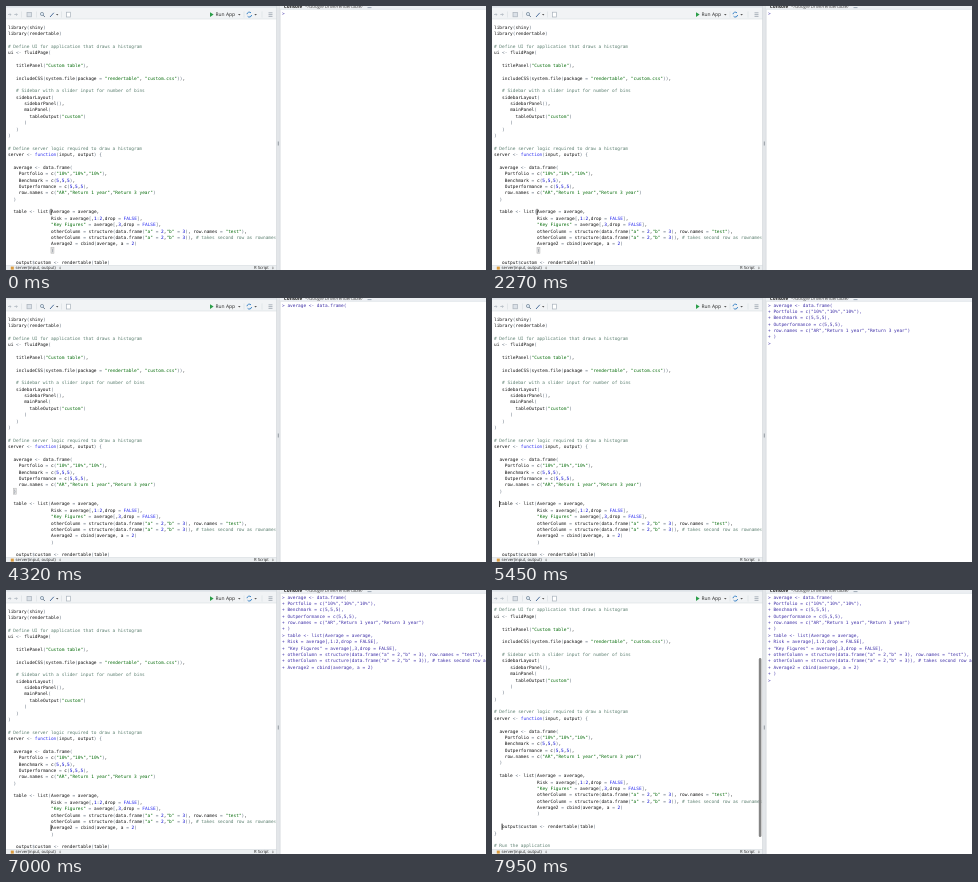
An HTML page for the animation above (8000 ms loop, 480 by 264 pixels).

```html
<!DOCTYPE html>
<html lang="en">
<head>
<meta charset="utf-8">
<title>Code editor and console</title>
<style>
  html, body { margin: 0; width: 100%; height: 100%; overflow: hidden; background: #fff; }
  svg { display: block; width: 480px; height: 264px; }
  text { text-rendering: geometricPrecision; white-space: pre; }
  .code text { font: 4.47px "DejaVu Sans Mono", "Noto Sans Mono", monospace; fill: #111; }
  .console text { fill: #3d2ea6; }
  .com { fill: #5c7f70; }
  .str { fill: #036a07; }
  .num { fill: #0000cd; }
  .key { fill: #2a2cf0; }
  .op { fill: #5d6a79; }
  .ui { font-family: "Open Sans", "Liberation Sans", sans-serif; fill: #222; }
</style>
</head>
<body>
<svg id="stage" viewBox="0 0 480 264">
  <defs>
    <clipPath id="leftClip"><rect y="13" width="269.5" height="246.5"/></clipPath>
  </defs>
  <rect width="480" height="264" fill="#fff"/>

  <g class="code" clip-path="url(#leftClip)">
    <g id="editor">
      <rect id="match" width="3" height="6" fill="#e4e4e4" stroke="#b5b5b5" stroke-width=".5"/>
      <rect id="caret" width=".8" height="6.2" fill="#111"/>
    </g>
  </g>
  <rect id="thumb" x="266.8" width="2.6" rx="1.3" fill="#858585"/>
  <g id="console" class="code console"></g>

  <!-- editor toolbar -->
  <rect width="271" height="13" fill="#f1f3f5"/>
  <rect width="271" height="1.6" fill="#dde2e7"/>
  <path d="M0 13H271" stroke="#d9dde1" stroke-width=".6"/>
  <g fill="none" stroke="#a9b2bb" stroke-width=".7">
    <path d="M2 8.5h3m-1.2-1.2L5 8.5L3.8 9.7M8.3 8.5h3m-1.2-1.2l1.2 1.2l-1.2 1.2"/>
    <path d="M15.5 5.5v6M30.5 5.5v6M55.5 5.5v6" stroke="#d3d8dc" stroke-width=".5"/>
    <rect x="21" y="6.4" width="4.4" height="4.4" fill="#dbe1e8"/>
    <rect x="60.5" y="6.2" width="4" height="4.8" fill="#fff"/>
    <circle cx="36" cy="8" r="1.6" stroke="#6f8193" fill="#e4effa"/>
    <path d="M37.2 9.2l1.7 1.8" stroke="#6f8193" stroke-width="1"/>
    <path d="M44 11l3.8-4.2" stroke="#4d6f9c" stroke-width="1"/>
    <path d="M238 5.5v6M256 5.5v6" stroke="#d3d8dc" stroke-width=".5"/>
    <path d="M262.5 6.8h4M262.5 8.6h4M262.5 10.4h4" stroke="#8f99a4"/>
    <path d="M241 8.2a2.3 2.3 0 0 1 4-1.3M245.6 9a2.3 2.3 0 0 1-4 1.3" stroke="#3f86c8" stroke-width="1"/>
  </g>
  <path d="M204 6.3l3.6 2.3l-3.6 2.3z" fill="#2a9d48"/>
  <g fill="#555">
    <path d="M50 7.9h2.4l-1.2 1.5zM232 7.9h2.6l-1.3 1.5zM248.3 7.9h2.6l-1.3 1.5z"/>
  </g>
  <text class="ui" x="209.6" y="10.4" font-size="4.9">Run App</text>

  <!-- status bar -->
  <rect y="259.5" width="271" height="4.5" fill="#eceff1"/>
  <path d="M0 259.5H271" stroke="#cfd4d8" stroke-width=".5"/>
  <rect x="4.8" y="260.6" width="3" height="3" fill="#d99a3d"/>
  <g class="ui" font-size="4.2">
    <text x="9.6" y="263.4">server(input, output)</text>
    <text x="248" y="263.4">R Script</text>
  </g>
  <path d="M53.2 261.4l.9-1l.9 1zm0 .9l.9 1l.9-1zM266 261.4l.9-1l.9 1zm0 .9l.9 1l.9-1z" fill="#666"/>

  <!-- pane divider and console header -->
  <rect x="270.5" width="3.7" height="264" fill="#e3e6e9"/>
  <path d="M270.5 0V264M274.2 0V264" stroke="#cbd0d4" stroke-width=".5"/>
  <path d="M272.3 135.5v4" stroke="#8b9299" stroke-width=".9"/>
  <rect x="274.2" width="205.8" height="3.4" fill="#eceff2"/>
  <path d="M274.2 3.4H480" stroke="#d5dade" stroke-width=".5"/>
  <g class="ui" font-size="4.7">
    <text x="277.8" y="1.7" font-weight="700">Console</text>
    <text x="299" y="1.7" fill="#444" font-size="4.4">~/Google Drive/rendertable/</text>
  </g>
  <path d="M361.5 1.6h4" stroke="#8a97a5" stroke-width=".8"/>
</svg>

<script>
const LOOP = 8000, CHAR = 2.691, LINE = 6.378, LEFT = 2, TOP = 22.5;
const CONSOLE_X = 276, CONSOLE_Y = 8.6;

const source = `library(shiny)
library(rendertable)

# Define UI for application that draws a histogram
ui <- fluidPage(

   titlePanel("Custom table"),

   includeCSS(system.file(package = "rendertable", "custom.css")),

   # Sidebar with a slider input for number of bins
   sidebarLayout(
      sidebarPanel(),
      mainPanel(
        tableOutput("custom")
      )
   )
)

# Define server logic required to draw a histogram
server <- function(input, output) {

  average <- data.frame(
    Portfolio = c("10%","10%","10%"),
    Benchmark = c(5,5,5),
    Outperformance = c(5,5,5),
    row.names = c("AR","Return 1 year","Return 3 year")
  )

  table <- list(Average = average,
                Risk = average[,1:2,drop = FALSE],
                "Key Figures" = average[,3,drop = FALSE],
                otherColumn = structure(data.frame("a" = 2,"b" = 3), row.names = "test"),
                otherColumn = structure(data.frame("a" = 2,"b" = 3)), # takes second row as rownames
                Average2 = cbind(average, a = 2)
                )

   output$custom <- rendertable(table)
}

# Run the application
shinyApp(ui = ui, server = server)`.split("\n");

// [line number, time its echo reaches the console]
const runs = [
  [23, 4320], [24, 4490], [25, 4700], [26, 4920], [27, 5140], [28, 5360],
  [30, 5950], [31, 6140], [32, 6320], [33, 6500], [34, 6680], [35, 7000], [36, 7500]
];
const STEP = 45;          // caret follows the echo
const FOCUS = 3000;       // click into the data frame line
const BLINK = 3950;       // caret goes dark until the first run

const $ = id => document.getElementById(id);
const indent = n => source[n - 1].search(/\S/);
const colX = col => LEFT + col * CHAR;
const lineY = n => TOP + (n - 1) * LINE;

function make(tag, parent, attrs, content) {
  const el = document.createElementNS("http://www.w3.org/2000/svg", tag);
  for (const k in attrs) el.setAttribute(k, attrs[k]);
  if (content !== undefined) el.textContent = content;
  parent.append(el);
  return el;
}

const token = /(?<com>#.*)|(?<str>"[^"]*")|(?<key>\b(?:FALSE|function)\b)|(?<num>\b\d+\b)|(?<op><-|[=:$()[\]{}])|[\w.]+|\s+|./g;

source.forEach((line, i) => {
  if (!line) return;
  const start = indent(i + 1);
  const text = make("text", $("editor"), { x: colX(start), y: lineY(i + 1) });
  for (const m of line.trim().matchAll(token)) {
    const kind = Object.keys(m.groups).find(k => m.groups[k]);
    make("tspan", text, kind ? { class: kind } : {}, m[0]);
  }
});
$("editor").append($("caret"));

// Console rows: a prompt, then the echoed code
const parts = [];
let promptAt = 0, prompt = ">";
runs.concat([[0, Infinity]]).forEach(([n, at], row) => {
  const y = CONSOLE_Y + row * LINE;
  const add = (x, str, from) =>
    parts.push({ el: make("text", $("console"), { x, y }, str), from });
  add(CONSOLE_X, prompt, promptAt);
  if (!n) return;
  const code = source[n - 1].trim();
  add(CONSOLE_X + 2 * CHAR, code, at);
  const done = code === ")";
  prompt = done ? ">" : "+";
  promptAt = at + (done ? 2 * STEP : STEP);
  if (done) promptAt -= 5;
});

function caretAt(t) {
  if (t < FOCUS) return { line: 30, col: 16, match: 36 };
  const last = runs.filter(r => t >= r[1] + STEP).pop();
  if (!last) return { line: 23, col: source[22].length, match: 28, dark: t >= BLINK };
  let line = last[0] + 1;
  while (!source[line - 1]) line++;
  return { line, col: indent(line) };
}

const show = (el, on) => el.setAttribute("visibility", on ? "visible" : "hidden");
const place = (el, x, y) => { el.setAttribute("x", x); el.setAttribute("y", y); };

function draw(t) {
  const c = caretAt(t);
  place($("caret"), colX(c.col) - .4, lineY(c.line) - 4.6);
  show($("caret"), !c.dark);
  show($("match"), c.match);
  if (c.match) place($("match"), colX(indent(c.match)) - .1, lineY(c.match) - 4.5);

  // keep the caret clear of the lower edge
  const scroll = c.line < 36 ? 0 : 7.5 + (c.line - 36) * LINE;
  $("editor").setAttribute("transform", `translate(0 ${-scroll})`);
  show($("thumb"), scroll);
  $("thumb").setAttribute("y", 50.5 + scroll * .87);
  $("thumb").setAttribute("height", 179);

  for (const p of parts) show(p.el, t >= p.from);
}

const begin = performance.now();
function tick() {
  draw((performance.now() - begin) % LOOP);
  requestAnimationFrame(tick);
}
tick();
</script>
</body>
</html>
```
